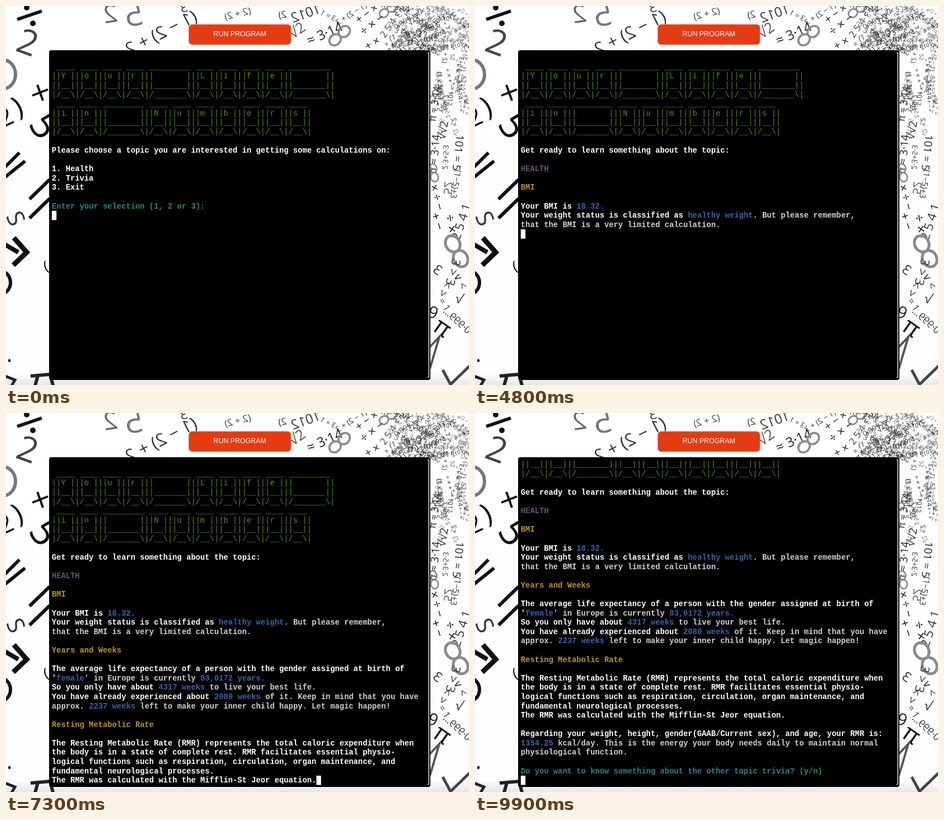
An HTML page with a canvas for the animation above (10000 ms loop, 827 px wide and 677 px high).

```html
<!DOCTYPE html>
<html lang="en">
<head>
<meta charset="utf-8">
<title>Your Life in Numbers</title>
<style>
  html, body { margin: 0; width: 100%; height: 100%; overflow: hidden; background: #fff; }
  canvas { display: block; }
</style>
</head>
<body>
<canvas id="stage" width="827" height="677"></canvas>
<script>
const W = 827, H = 677, LOOP = 10000;
const ROW = 16.59, COL = 8.292, LEFT = 81.8, TOP = 92.2, LAST_ROW = 34;
const MONO = '13.82px "Liberation Mono", monospace';
const COLORS = {
  w: '#ffffff', g: '#d0d2cf', b: '#3764a3', c: '#2a8187',
  y: '#b9942a', m: '#6c5178', n: '#4a9410'
};
const ctx = document.getElementById('stage').getContext('2d');

// Each character becomes a key cap four rows tall.
function keyboard(text) {
  const rows = ['', '', '', ''];
  for (const ch of text) {
    const w = ch === ' ' ? 7 : 2, bar = '_'.repeat(w);
    rows[0] += ' ' + bar + '__';
    rows[1] += '||' + ch.padEnd(w) + '|';
    rows[2] += '||' + bar + '|';
    rows[3] += '|/' + bar + '\\';
  }
  return rows.map((row, i) => '~n' + row + (i ? '|' : ''));
}

// "~x" switches to colour x; a line starts white.
const banner = ['', ...keyboard('Your Life '), ...keyboard('in Numbers'), ''];
const menu = [...banner, ...`Please choose a topic you are interested in getting some calculations on:

1. Health
2. Trivia
3. Exit

~cEnter your selection (1, 2 or 3):
`.split('\n')];
const report = [...banner, ...`Get ready to learn something about the topic:

~mHEALTH

~yBMI

Your BMI is ~b18.32.
Your weight status is classified as ~bhealthy weight~g. But please remember,
~gthat the BMI is a very limited calculation.

~yYears and Weeks

The average life expectancy of a person with the gender assigned at birth of
'~bfemale~g' in Europe is currently ~b83,0172 years.
So you only have about ~b4317 weeks~g to live your best life.
You have already experienced about ~b2080 weeks~g of it. Keep in mind that you have
~gapprox. ~b2237 weeks~g left to make your inner child happy. Let magic happen!

~yResting Metabolic Rate

The Resting Metabolic Rate (RMR) represents the total caloric expenditure when
the body is in a state of complete rest. RMR facilitates essential physio-
logical functions such as respiration, circulation, organ maintenance, and
fundamental neurological processes.
The RMR was calculated with the Mifflin-St Jeor equation.

Regarding your weight, height, gender(GAAB/Current sex), and age, your RMR is:
~b1354.25~g kcal/day. This is the energy your body needs daily to maintain normal
~gphysiological function.

~cDo you want to know something about the other topic trivia? (y/n)
`.split('\n')];
const chosen = [...menu.slice(0, -1), '1'];

// Start time, lines, cursor line, cursor column
const steps = [
  [0, menu, 17, 0], [700, chosen, 17, 1], [1100, report, 13, 0],
  [2900, report, 15, 0], [3500, report, 19, 0], [4900, report, 21, 0],
  [5200, report, 27, 0], [6200, report, 29, 0], [6600, report, 34, 57],
  [7700, report, 35, 0], [8600, report, 39, 0], [9000, report, 41, 0]
];

function drawLine(line, row) {
  let col = 0;
  const y = TOP + row * ROW + 4;
  const parts = line[0] === '~' ? line.slice(1).split('~') : ('w' + line).split('~');
  for (const part of parts) {
    const key = part[0], text = part.slice(1);
    ctx.font = (key === 'n' ? '' : 'bold ') + MONO;
    ctx.fillStyle = COLORS[key];
    ctx.fillText(text, LEFT + col * COL, y);
    col += text.length;
  }
}

function drawTerminal(time) {
  const [, lines, cursor, col] = steps.findLast(s => s[0] <= time);
  const shift = Math.max(0, cursor - LAST_ROW);
  const end = col ? cursor : cursor - 1;
  ctx.textAlign = 'left';
  ctx.textBaseline = 'alphabetic';
  for (let i = shift; i <= end; i++) drawLine(lines[i], i - shift);
  ctx.fillStyle = '#fff';
  ctx.fillRect(LEFT + col * COL, TOP + (cursor - shift) * ROW - 8.4, COL, ROW);
}

function makeBackdrop() {
  const canvas = document.createElement('canvas');
  canvas.width = W;
  canvas.height = H;
  const g = canvas.getContext('2d');
  let seed = 11;
  const random = () => (seed = (seed * 16807) % 2147483647) / 2147483647;
  const pick = list => list[Math.floor(random() * list.length)];

  function put(text, x, y, size, deg = 0, color = '#111', flip = false) {
    g.save();
    g.translate(x, y);
    g.rotate(deg * Math.PI / 180);
    if (flip) g.scale(-1, 1);
    g.font = size + 'px "Open Sans", "DejaVu Sans", sans-serif';
    g.fillStyle = color;
    g.fillText(text, 0, 0);
    g.restore();
  }
  function line(width, color, ...points) {
    g.lineWidth = width;
    g.strokeStyle = color;
    g.beginPath();
    for (let i = 0; i < points.length; i += 2) g.lineTo(points[i], points[i + 1]);
    g.stroke();
  }
  function ring(x, y, rx, ry, width, color) {
    g.lineWidth = width;
    g.strokeStyle = color;
    g.beginPath();
    g.ellipse(x, y, rx, ry, 0, 0, 7);
    g.stroke();
  }
  function infinity(x, y, size, deg, color = '#8b8b8b') {
    g.save();
    g.translate(x, y);
    g.rotate(deg * Math.PI / 180);
    ring(-size / 2, 0, size / 2, size * 0.42, size * 0.17, color);
    ring(size / 2, 0, size / 2, size * 0.42, size * 0.17, color);
    g.restore();
  }

  const shade = g.createLinearGradient(0, 0, 0, H);
  shade.addColorStop(0, '#fff');
  shade.addColorStop(0.97, '#fdfdfd');
  shade.addColorStop(1, '#e6e6e6');
  g.fillStyle = shade;
  g.fillRect(0, 0, W, H);
  g.textAlign = 'center';
  g.textBaseline = 'middle';

  // Left edge
  line(6, '#111', 20, 24, 64, 9);
  g.fillStyle = '#111';
  for (const [x, y] of [[37, 3], [48, 31]]) {
    g.beginPath();
    g.arc(x, y, 5, 0, 7);
    g.fill();
  }
  put('2', 37, 70, 62, 20, '#444');
  ring(-6, 122, 23, 26, 6, '#777');
  put('2', 0, 202, 46, -25);
  put(')', 22, 183, 50, -25);
  line(4, '#111', 47, 160, 75, 149);
  line(4, '#111', 56, 141, 66, 169);
  put('5', 64, 217, 68, 55);
  line(6, '#111', -2, 288, 24, 262);
  line(6, '#111', -2, 306, 34, 277);
  line(6, '#111', 42, 345, 78, 310);
  line(6, '#111', 42, 379, 78, 344);
  put('S', 14, 381, 42, 65, '#333');
  line(9, '#111', 14, 414, 37, 440, 13, 463);
  line(8, '#111', -2, 426, 22, 440);
  ring(-9, 494, 17, 20, 6, '#111');
  put('(', 72, 467, 26, -20);
  put('·', 6, 638, 40);
  line(5, '#222', -2, 661, 16, 668, 10, 678);
  line(6, '#222', 44, 661, 90, 657);
  line(6, '#222', 57, 660, 52, 678);
  line(6, '#222', 79, 658, 84, 678);

  // Top edge
  put('2', 187, 18, 44, -8, '#666', true);
  put('5', 229, 20, 58, -8, '#777', true);
  put('(1 − 2) + 2', 278, 50, 31, -27, '#333', true);
  put('3', 318, 5, 23, -15, '#333', true);
  put('(2 + 2)', 414, 15, 17, -14, '#444', true);
  put('2)', 494, 17, 17, -10, '#333', true);
  put('√2', 521, 45, 26, -35, '#555');
  put('1012', 536, 15, 24, -20, '#333', true);
  put('≈ 3·14', 570, 51, 24, -24, '#222');
  infinity(596, 53, 22, -42);
  infinity(682, 8, 17, -35);
  put('3 = 1', 575, 18, 13, 25, '#333', true);
  put('(1 − 2) + 3', 617, 15, 14, -32, '#333', true);
  put('+ − ×', 645, 15, 20, -36, '#222');
  put('÷ × −', 655, 34, 22, -38, '#222');
  put('+ ×', 655, 68, 20, -30, '#222');
  put('2 5 4', 684, 40, 17, -55, '#444');

  // Small print, shrinking towards the upper right corner
  const formulas = ['π ≈ 3·14', '101 = 5', '(1 − 5) + 3', '√2 + 2', '÷ × + −',
    '3 < 5', '0·999', '52', '(2 + 2)', '+ − ×', '2·5+3', '1012'];
  const greys = ['#222', '#333', '#555', '#777'];
  for (let i = 0; i < 85; i++) {
    const x = 695 + random() * 132;
    put(pick(formulas), x, random() * 80, 14 - (x - 695) / 26,
      -52 + random() * 110, pick(greys), random() < 0.5);
  }
  for (let i = 0; i < 30; i++) {
    put(pick(formulas), 764 + random() * 62, 85 + random() * 135,
      9 + random() * 3, 75 + random() * 30, pick(greys), random() < 0.5);
  }
  infinity(764, 161, 13, -60);
  infinity(706, 63, 13, -45);

  // Right edge
  put('π ≈ 3·14', 767, 175, 17, -82, '#222');
  put('√√2', 782, 222, 20, -80, '#333');
  put('2·3+5·3', 784, 270, 13, 92, '#333', true);
  put('101 = 5', 806, 262, 19, 96, '#222');
  put('(1−5)+3', 802, 318, 15, 100, '#333');
  put('52', 788, 325, 20, 95, '#555', true);
  put('π ≈ 3·14', 767, 265, 19, -85, '#222');
  infinity(764, 298, 16, 80);
  put('× ÷ −', 768, 342, 21, 75);
  put('+ −', 769, 385, 22, 72);
  put('÷ ×', 793, 389, 24, 80);
  put('2 5 4 1', 815, 386, 22, -72, '#333');
  infinity(805, 438, 30, 62);
  put('3', 770, 473, 24, 35, '#333', true);
  put('3 > 3', 797, 475, 22, 105, '#333');
  put('< >', 783, 505, 21, 120, '#333');
  put('√', 809, 525, 24, 15, '#333');
  put('∨ <', 810, 492, 19, 60, '#333');
  put('= 1', 782, 534, 17, 58, '#333');
  put('0·999…', 805, 563, 18, 42, '#333', true);
  put('9', 762, 550, 30, 20, '#222');
  put('π', 778, 577, 43, 35);
  line(4, '#555', 757, 609, 774, 591, 757, 648);
  line(5, '#444', 780, 650, 794, 676, 828, 643);

  // Button
  g.beginPath();
  g.roundRect(326.5, 33, 182.5, 36, 6);
  g.fillStyle = '#e43b12';
  g.fill();
  g.lineWidth = 1;
  g.strokeStyle = '#ea8065';
  g.stroke();
  g.fillStyle = '#fff';
  g.font = '12.4px "Liberation Sans", Arial, sans-serif';
  g.fillText('RUN PROGRAM', 417.7, 51);

  // Terminal frame and its scrollbar edge
  g.beginPath();
  g.roundRect(77, 79, 681, 589, 4);
  g.fillStyle = '#000';
  g.fill();
  line(1.5, '#e4e4e4', 753, 83.5, 755.3, 84, 755.3, 663, 753, 663.5);
  return canvas;
}

const backdrop = makeBackdrop();

function frame(now) {
  ctx.drawImage(backdrop, 0, 0);
  drawTerminal(now % LOOP);
  requestAnimationFrame(frame);
}
frame(0);
</script>
</body>
</html>
```
